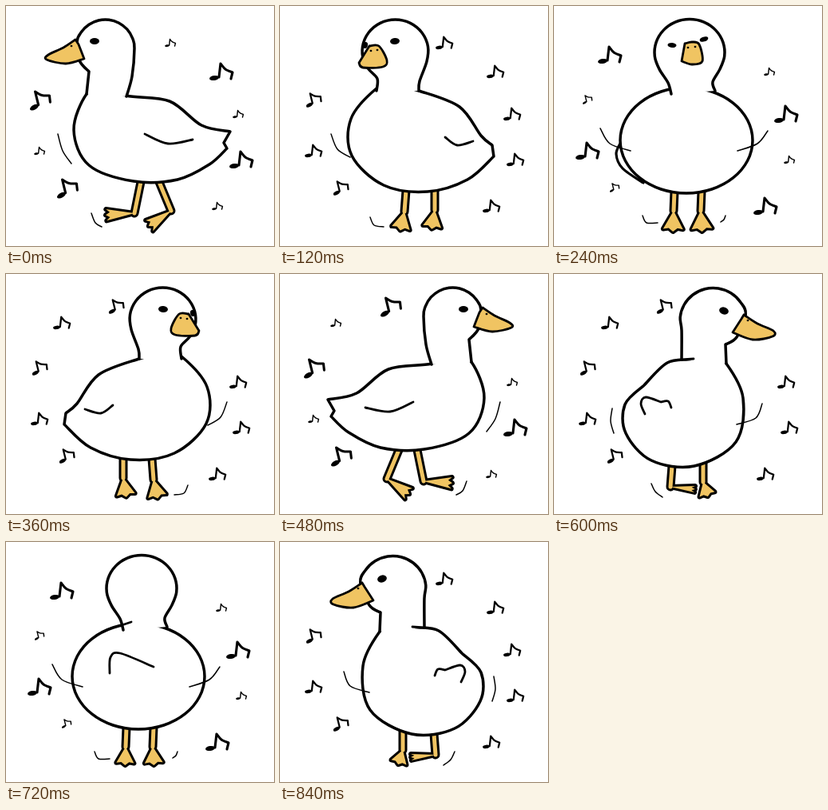
An HTML page with a canvas for the animation above (960 ms loop, 336 px wide and 300 px high).

```html
<!DOCTYPE html>
<html lang="en">
<head>
<meta charset="utf-8">
<title>Turning duck</title>
<style>
  html, body { margin: 0; width: 100%; height: 100%; overflow: hidden; background: #fff; }
  canvas { display: block; }
</style>
</head>
<body>
<canvas id="stage" width="336" height="300"></canvas>
<script>
const ctx = document.getElementById('stage').getContext('2d');
const STEP_MS = 120, STEPS = 8, MIRROR = 341;
const INK = '#000', ORANGE = '#f0c462', WHITE = '#fff';

// Key points of a smooth curve; "*" marks a sharp corner.
function points(text) {
  return text.split(' ').flatMap(item => {
    const point = item.replace('*', '').split(',').map(Number);
    return item.endsWith('*') ? [point, point] : [point];
  });
}

// Points on an ellipse, clockwise between two angles given in half turns.
function arc(cx, cy, rx, ry, from = 0, to = 1.875, count = 16) {
  return Array.from({ length: count }, (_, i) => {
    const angle = Math.PI * (from + (to - from) * i / (count - 1));
    return [cx + rx * Math.cos(angle), cy + ry * Math.sin(angle)];
  });
}

function headWithNeck(front, skull, nape) {
  return [...points(front), ...skull, ...points(nape)];
}

const side = {
  body: points('125,98 151,112 205,119 245,149 281,157* 273,171* 277,178* 255,198 215,217 160,219 104,199 85,155 101,110'),
  head: headWithNeck('101,110 104,82* 92,68', arc(124.5, 53, 36.5, 36, 1.08, 2, 9), '158,88 151,113'),
  beak: points('87,42* 72,52 53,61 51,67 75,72 98,66* 91,48*'),
  nostrils: [[82, 50]],
  eyes: [[111, 44, 6, 4, 0]],
  legs: [
    { hip: [169, 220], ankle: [161, 259], turn: .98, length: 36, spread: .2 },
    { hip: [192, 220], ankle: [207, 256], turn: .81, length: 34, spread: .24 }
  ],
  marks: ['174,160 203,172 234,167'],
  motion: ['65,160 71,181 82,197', '107,259 112,271 120,276']
};

const frontQuarter = {
  body: points('140,98 174,106 225,126 252,162 266,174* 268,188* 235,217 185,232 130,224 90,187 89,141 121,103'),
  head: headWithNeck('121,106 122,91 112,80', arc(144.5, 57, 41.5, 40, .9, 2.1, 9), '175,94 174,106'),
  beak: points('112,50* 124,50 134,68 129,76 104,77 99,71*'),
  nostrils: [[114, 56], [122, 55]],
  eyes: [[107, 49, 3, 4, .2], [144, 44, 6, 4, -.1]],
  legs: [
    { hip: [158, 231], ankle: [156, 257], turn: .57, length: 24, spread: .5 },
    { hip: [194, 231], ankle: [194, 255], turn: .55, length: 24, spread: .5 }
  ],
  marks: ['207,164 222,174 242,169'],
  motion: ['64,160 72,179 88,189', '113,264 118,274 130,276']
};

const facing = {
  body: arc(166, 168, 83, 66),
  head: headWithNeck('147,110 143,96', arc(170, 58, 44, 41.5, .83, 2.17, 11), '199,95 202,106'),
  motion: ['58,153 70,172 96,181', '268,156 255,172 230,181', '111,262 116,271 130,271', '215,262 213,267 209,270']
};
const facingLegs = length => [
  { hip: [151, 232], ankle: [150, 256], turn: .51, length, spread: .5 },
  { hip: [185, 232], ankle: [184, 256], turn: .48, length, spread: .52 }
];

const front = {
  ...facing,
  tail: points('84,170 78,185 86,203 112,221'),
  beak: points('164,47* 173,45 182,48 186,69 173,73 160,69*'),
  nostrils: [[168, 52], [177, 51]],
  eyes: [[148, 49, 5.5, 3, .1], [188, 41.5, 5.5, 3, -.3]],
  legs: facingLegs(26),
  marks: []
};

const back = {
  ...facing,
  legs: facingLegs(23),
  marks: ['145,104 157,100', '130,164 131,144 143,139 185,156']
};

const backQuarter = {
  body: points('145,98 168,106 199,111 228,139* 252,163 251,199 219,233 165,240 113,210 104,155 125,112'),
  head: headWithNeck('125,112 126,88* 112,79', arc(141.5, 58, 41.5, 40.5, 1.06, 2.1, 9), '181,107'),
  beak: points('103,51* 86,62 66,71 67,78 92,82 117,73* 106,56*'),
  nostrils: [[98, 58]],
  eyes: [[128, 46, 6, 4.5, -.3]],
  legs: [
    { hip: [154, 237], ankle: [154, 260], turn: .6, length: 19, spread: .55 },
    { hip: [193, 240], ankle: [195, 266], turn: .97, length: 31, spread: .13 }
  ],
  marks: ['166,106 181,107', '194,167 198,159 207,160* 226,154 232,162 227,175'],
  motion: ['80,162 88,180 112,188', '268,168 270,184 266,199', '219,262 214,272 205,279']
};

// Half a turn away from the viewer, mirrored on the way through the right.
const turnaround = [side, frontQuarter, front, frontQuarter, side, backQuarter, back, backQuarter];
const isMirrored = step => step >= 3 && step <= 5;

// Notes pulse over four steps; those near the head show only for some steps.
const TILT = -.36;
const notes = [
  { x: 270, y: 82, beat: 0, from: 6, shown: 5 },
  { x: 206, y: 46, beat: 2, from: 7, shown: 3 },
  { x: 137, y: 39, beat: 0, from: 3, shown: 3, tilt: TILT },
  { x: 70, y: 61, beat: 2, from: 2, shown: 5 },
  { x: 41, y: 116, beat: 0, tilt: TILT },
  { x: 291, y: 135, beat: 2 },
  { x: 42, y: 181, beat: 2 },
  { x: 295, y: 192, beat: 0 },
  { x: 75, y: 226, beat: 0, tilt: TILT },
  { x: 265, y: 250, beat: 2 }
];
const noteStem = points('-3,7* -1,-10* 5,-3 14,1* 12,9*');

function trace(p, closed) {
  const n = p.length;
  const at = i => closed ? p[(i + n) % n] : p[Math.max(0, Math.min(n - 1, i))];
  const path = new Path2D();
  path.moveTo(...p[0]);
  for (let i = 0; i < (closed ? n : n - 1); i++) {
    const [a, b, c, d] = [at(i - 1), at(i), at(i + 1), at(i + 2)];
    if (b === c) continue;
    path.bezierCurveTo(b[0] + (c[0] - a[0]) / 6, b[1] + (c[1] - a[1]) / 6,
                       c[0] - (d[0] - b[0]) / 6, c[1] - (d[1] - b[1]) / 6, c[0], c[1]);
  }
  return path;
}

function shape(p, width, fill, closed = true) {
  const path = trace(p, closed);
  ctx.fillStyle = fill;
  ctx.fill(path);
  ctx.lineWidth = width;
  ctx.stroke(path);
}

function line(p, width) {
  ctx.lineWidth = width;
  ctx.stroke(trace(p));
}

function dot(x, y, rx, ry, angle = 0) {
  ctx.beginPath();
  ctx.ellipse(x, y, rx, ry, angle, 0, Math.PI * 2);
  ctx.fillStyle = INK;
  ctx.fill();
}

// A webbed foot is a fan with three toes; "turn" is its direction in half turns.
function drawLeg({ hip, ankle, turn, length, spread }) {
  const path = new Path2D();
  path.moveTo(...ankle);
  for (let i = -2; i <= 2; i++) {
    const angle = Math.PI * turn + spread * i / 2;
    const reach = length * (i % 2 ? .86 : 1);
    path.lineTo(ankle[0] + reach * Math.cos(angle), ankle[1] + reach * Math.sin(angle));
  }
  path.closePath();
  const shin = new Path2D();
  shin.moveTo(...hip);
  shin.lineTo(...ankle);
  for (const [color, shinWidth, footWidth] of [[INK, 11, 6], [ORANGE, 5, 0]]) {
    ctx.strokeStyle = ctx.fillStyle = color;
    ctx.lineWidth = shinWidth;
    ctx.stroke(shin);
    ctx.fill(path);
    ctx.lineWidth = footWidth;
    if (footWidth) ctx.stroke(path);
  }
  ctx.strokeStyle = INK;
}

function drawDuck(pose) {
  pose.legs.forEach(drawLeg);
  if (pose.tail) shape(pose.tail, 3.2, WHITE, false);
  shape(pose.body, 3.5, WHITE);
  shape(pose.head, 3.5, WHITE, false);
  pose.marks.forEach(mark => line(points(mark), 2.8));
  pose.motion.forEach(mark => line(points(mark), 1.5));
  if (!pose.beak) return;
  shape(pose.beak, 2.8, ORANGE);
  pose.nostrils.forEach(([x, y]) => dot(x, y, 1.4, 1.2));
  pose.eyes.forEach(eye => dot(...eye));
}

function drawNote({ x, y, beat, from = 0, shown = STEPS, tilt = 0 }, step) {
  if ((step - from + STEPS) % STEPS >= shown) return;
  const scale = .73 + .27 * Math.cos((step + beat) * Math.PI / 2);
  ctx.save();
  ctx.translate(x, y);
  ctx.rotate(tilt);
  ctx.scale(scale, scale);
  dot(-9, 8, 6, 3, -.15);
  line(noteStem, 3.1);
  ctx.restore();
}

function draw(time) {
  const step = Math.floor(time / STEP_MS) % STEPS;
  ctx.fillStyle = WHITE;
  ctx.fillRect(0, 0, 336, 300);
  ctx.strokeStyle = INK;
  ctx.lineCap = ctx.lineJoin = 'round';
  ctx.save();
  if (isMirrored(step)) ctx.transform(-1, 0, 0, 1, MIRROR, 0);
  drawDuck(turnaround[step]);
  ctx.restore();
  notes.forEach(note => drawNote(note, step));
}

const start = performance.now();
function tick() {
  draw(performance.now() - start);
  requestAnimationFrame(tick);
}
tick();
</script>
</body>
</html>
```
